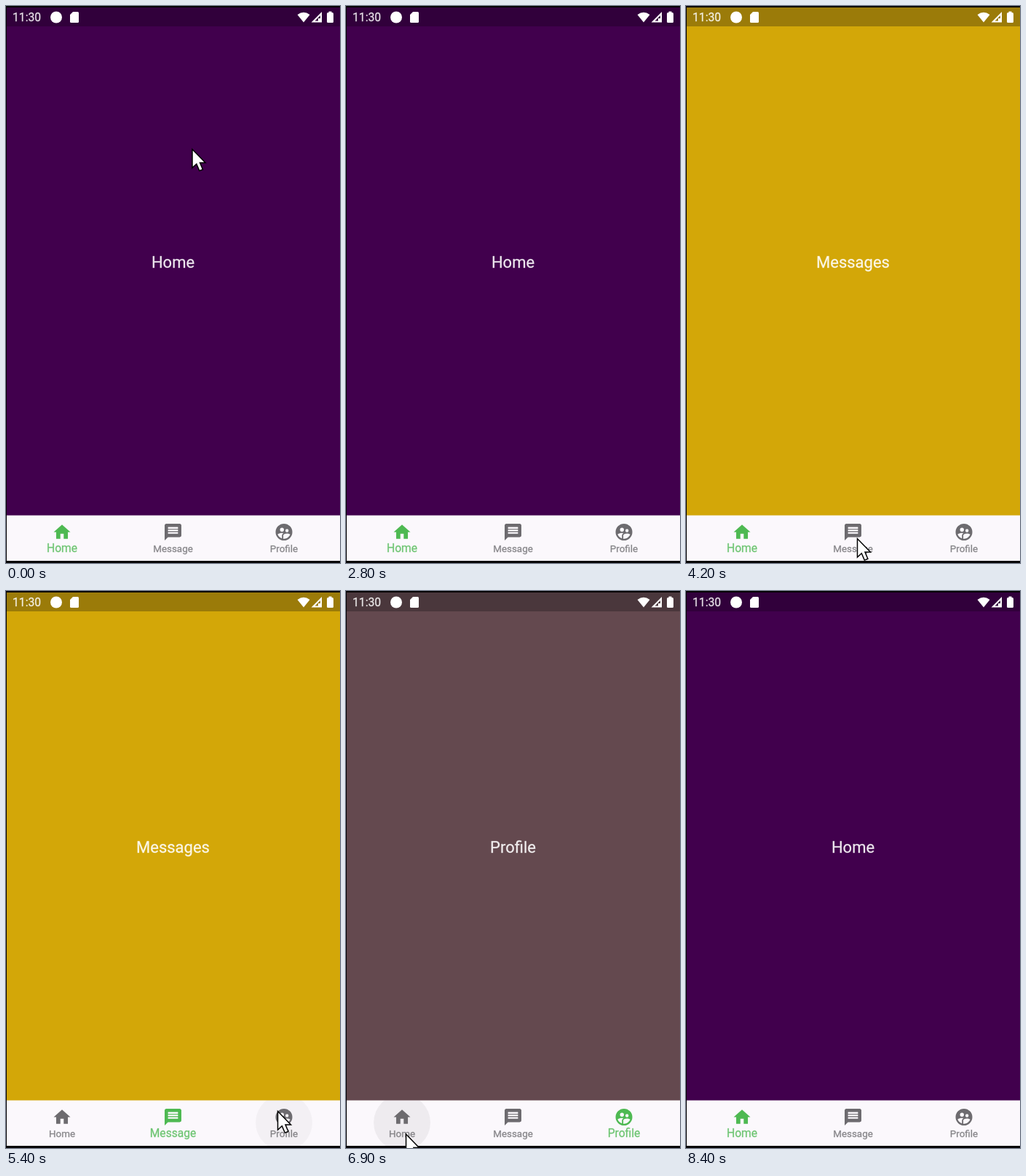
An HTML page with a canvas that plays this animation: 459x766 px, repeating every 8.9 s.

```html
<!DOCTYPE html>
<html lang="en">
<head>
<meta charset="utf-8">
<title>Bottom navigation</title>
<style>
  html, body { margin: 0; height: 100%; overflow: hidden; background: #000; }
  canvas { display: block; }
</style>
</head>
<body>
<canvas id="stage" width="459" height="766"></canvas>
<script>
const ctx = document.getElementById('stage').getContext('2d');
const LOOP = 8900, STEP = 100;
const GRAY = [109, 107, 111], GREEN = [78, 185, 82];

const pages = [
  { title: 'Home', color: '#41004d', bar: '#31003b' },
  { title: 'Messages', color: '#d3a708', bar: '#9b7b09' },
  { title: 'Profile', color: '#64494f', bar: '#4a373c' }
];

// Icons on a 24-unit grid
const tabs = [
  { label: 'Home', x: 77, icon: 'M10 20v-6h4v6h5v-8h3L12 3 2 12h3v8z' },
  { label: 'Message', x: 229.5, icon: 'M20 2H4c-1.1 0-2 .9-2 2v18l4-4h14c1.1 0 2-.9 2-2V4c0-1.1-.9-2-2-2zM18 14H6v-2h12zM18 11H6V9h12zM18 8H6V6h12z' },
  { label: 'Profile', x: 382, icon: 'M12 2a10 10 0 1 0 0 20a10 10 0 1 0 0-20zM15.6 8.34a1.93 1.93 0 1 1 0 3.86a1.93 1.93 0 1 1 0-3.86zM9.6 6.76a2.36 2.36 0 1 1 0 4.72a2.36 2.36 0 1 1 0-4.72zM9.6 15.9v3.74c-2.4-.75-4.3-2.6-5.14-4.96 1.05-1.12 3.67-1.69 5.14-1.69.53 0 1.2.08 1.9.22-1.64.87-1.9 2.02-1.9 2.69zM12 20l-.8-.04V15.9c0-1.42 2.94-2.13 4.4-2.13 1.07 0 2.92.39 3.84 1.15C18.27 17.88 15.38 20 12 20z' }
];
for (const tab of tabs) tab.path = new Path2D(tab.icon);

// press: ripple begins; open: page changes
const taps = [
  { tab: 1, press: 4200, open: 4200 },
  { tab: 2, press: 5300, open: 5500 },
  { tab: 0, press: 6700, open: 7000 }
];

// time, x, y of the pointer tip
const pointerKeys = [
  [0, 256, 197], [900, 276, 144], [1200, 276, 144], [1300, 277, 144], [1500, 277, 144],
  [2300, 240, 715], [2600, 240, 790], [2900, 240, 790], [3300, 238, 733], [4000, 235.5, 732.5],
  [4500, 235.5, 732.5], [5200, 373.5, 715.5], [5700, 373.5, 715.5], [6600, 82.5, 747],
  [7000, 82.5, 747], [7400, 74, 790], [LOOP, 74, 790]
];

const pointerShape = new Path2D('M0 0V25.5L5.8 20.2L9.8 29.6L14.4 27.8L10.5 18.6H18Z');
const wifi = new Path2D('M400.5 12Q409 5.6 417.5 12L409 22.5Z');
const signal = new Path2D('M434 8V22.5H419.5ZM432 13L424.5 20.5H429V17H432Z');
const sdCard = new Path2D('M92 8H98.5Q100 8 100 9.5V21.5Q100 23 98.5 23H89.5Q88 23 88 21.5V12Z');

const clamp = v => Math.max(0, Math.min(1, v));
const mix = (a, b, p) => a + (b - a) * p;

function rect(color, x, y, w, h) {
  ctx.fillStyle = color;
  ctx.fillRect(x, y, w, h);
}

function disc(color, x, y, r) {
  ctx.fillStyle = color;
  ctx.beginPath();
  ctx.arc(x, y, r, 0, Math.PI * 2);
  ctx.fill();
}

// A faint outline gives the lettering its soft edge
function write(text, x, y, size, color, { align = 'center', weight = 400, alpha = 1 } = {}) {
  ctx.save();
  ctx.font = `${weight} ${size}px Roboto, sans-serif`;
  ctx.textAlign = align;
  ctx.fillStyle = ctx.strokeStyle = color;
  ctx.globalAlpha = alpha;
  ctx.fillText(text, x, y);
  ctx.globalAlpha = alpha * 0.35;
  ctx.lineWidth = 0.8;
  ctx.lineJoin = 'round';
  ctx.strokeText(text, x, y);
  ctx.restore();
}

function statusBar(color) {
  rect(color, 1, 2, 458, 26);
  write('11:30', 9, 21, 15.7, '#fff', { align: 'left', alpha: 0.88 });
  disc('#fff', 69, 15.5, 8);
  ctx.fill(sdCard);
  ctx.fill(wifi);
  ctx.fill(signal, 'evenodd');
  ctx.beginPath();
  ctx.roundRect(441, 9, 9, 14, 1.5);
  ctx.fill();
  ctx.fillRect(443.5, 7.5, 4, 2);
}

function rippleAlpha(age) {
  return age <= 400 ? clamp(age < 200 ? age * 0.006 : 1) : clamp((600 - age) / 200);
}

function selection(index, t) {
  let level = index === 0 ? 1 : 0;
  for (const { tab, open } of taps) {
    if (t >= open) level = mix(level, tab === index ? 1 : 0, clamp((t - open) / 200));
  }
  return level;
}

function navigation(t) {
  ctx.save();
  ctx.beginPath();
  ctx.rect(1, 700.5, 458, 62.5);
  ctx.clip();
  rect('#fbf8fc', 1, 700, 458, 64);
  for (const { tab, press } of taps) {
    if (t > press) disc(`rgba(0,0,0,${0.05 * rippleAlpha(t - press)})`, tabs[tab].x, 731, 39);
  }
  tabs.forEach((tab, i) => {
    const level = selection(i, t);
    const color = `rgb(${GRAY.map((c, k) => Math.round(mix(c, GREEN[k], level)))})`;
    ctx.save();
    ctx.translate(tab.x, 723.5);
    ctx.scale(1.15, 1.15);
    ctx.translate(-12, -12);
    ctx.fillStyle = color;
    ctx.fill(tab.path, 'evenodd');
    ctx.restore();
    write(tab.label, tab.x, 751, mix(13.4, 15.6, level), color, { alpha: 0.8 });
  });
  ctx.restore();
}

function pointer(t) {
  const next = pointerKeys.findIndex(key => key[0] > t);
  const [t0, x0, y0] = pointerKeys[next - 1];
  const [t1, x1, y1] = pointerKeys[next];
  const p = (t - t0) / (t1 - t0);
  const eased = p * p * (3 - 2 * p);
  ctx.save();
  ctx.translate(mix(x0, x1, eased), mix(y0, y1, eased));
  ctx.fillStyle = '#fff';
  ctx.strokeStyle = '#000';
  ctx.lineWidth = 1.5;
  ctx.fill(pointerShape);
  ctx.stroke(pointerShape);
  ctx.restore();
}

function draw(t) {
  const opened = taps.filter(tap => t >= tap.open).pop();
  const page = pages[opened ? opened.tab : 0];
  rect('#050306', 0, 0, 459, 766);
  rect(page.color, 1, 28, 458, 673);
  statusBar(page.bar);
  write(page.title, 229.5, 360, 22, '#fff', { alpha: 0.9 });
  navigation(t);
  pointer(t);
}

const start = performance.now();
function tick() {
  const t = (performance.now() - start) % LOOP;
  draw(Math.floor(t / STEP) * STEP);
  requestAnimationFrame(tick);
}
tick();
</script>
</body>
</html>
```
